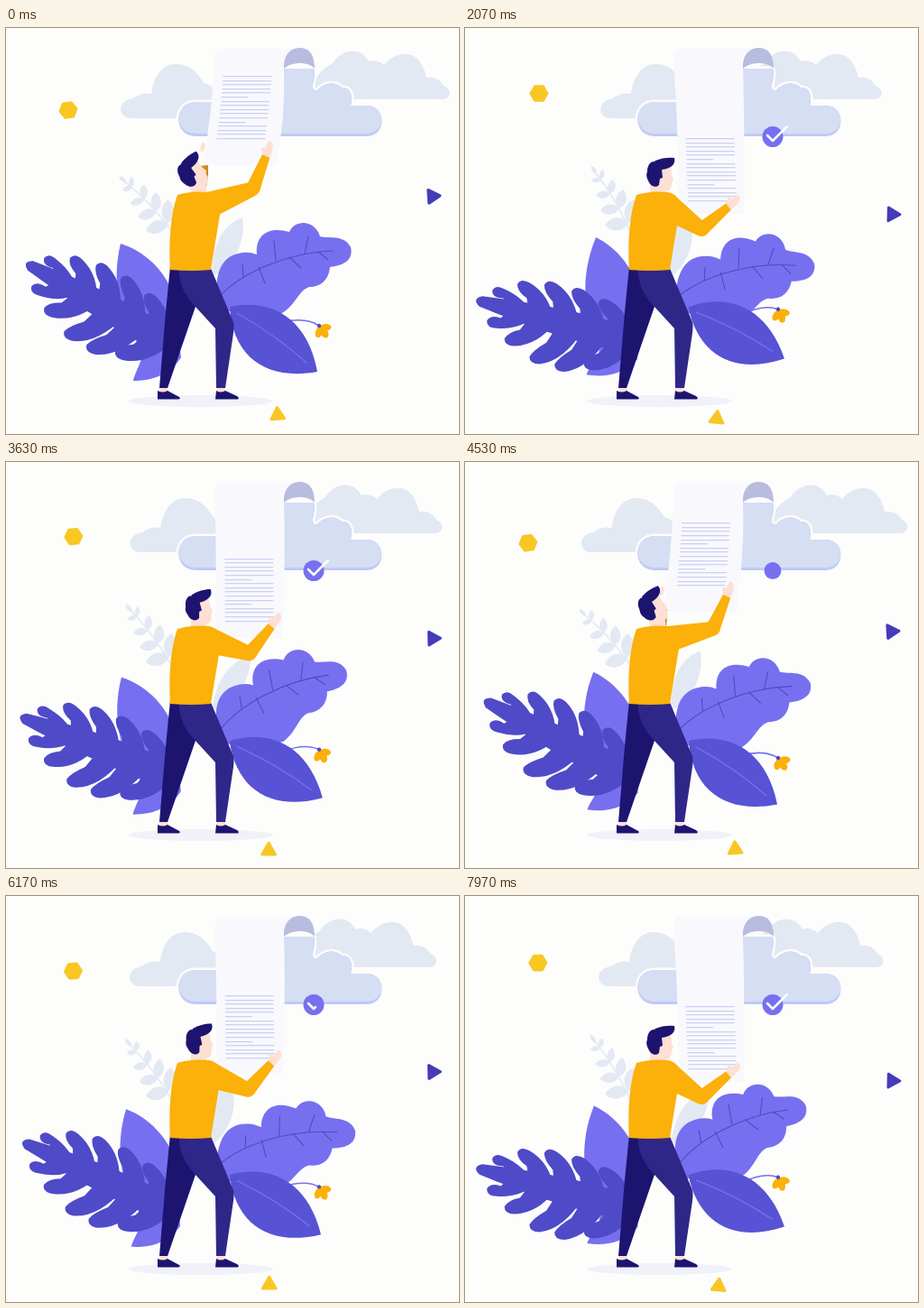
An HTML page with a canvas that plays this animation: 502 by 450 pixels, repeating every 8 s.

```html
<!DOCTYPE html>
<html lang="en">
<head>
<meta charset="utf-8">
<title>Pulling down a list</title>
<style>
  html, body { margin: 0; width: 100%; height: 100%; overflow: hidden; background: #fdfdfc; }
  canvas { display: block; }
</style>
</head>
<body>
<canvas id="stage" width="502" height="450"></canvas>
<script>
const ctx = document.getElementById('stage').getContext('2d');
const LOOP = 8000, CYCLE = 5200;
const C = {
  bg: '#fdfdfc', pale: '#e3e9f3', grey: '#d5def2', edge: '#c0c9f6', paper: '#f9f9fd',
  roll: '#b8bde0', line: '#cdd1f3', purple: '#7670f0', deep: '#5852d4', vein: '#504ac0',
  fern: '#4f4ac8', shirt: '#fbb00a', sleeve: '#cf8d1c', skin: '#fde0d3', navy: '#1d1470',
  thigh: '#2f2788', yellow: '#f9c724', tri: '#443cb8', shade: '#f0f1f9'
};

// Key times: one shared cycle, and a freer sway for the big leaf
const BEATS = [0, 330, 930, 1630, 2070, 2770, 3630, 4950, 5200];
const SWAY = [0, 930, 2070, 3630, 5530, 6830, 7970];
const KEYS = {
  pull: [0, .34, .77, 1, 1, 1, .73, 0, 0],
  drift: [0, .12, .4, .78, 1, .91, .45, 0, 0],
  cloud: [0, .3, .47, .87, 1, .93, .27, 0, 0],
  fern: [14, 10, 10, 0, 0, 0, 6.5, 14, 14],
  droop: [0, .27, .4, .97, 1, 1, .62, 0, 0],
  sprig: [0, .19, .45, 1, 1, .93, .53, 0, 0],
  oak: [0, 5.2, 7.2, -5, 7.4, 4.6, -4.6]
};

const mix = (a, b, k) => a + (b - a) * k;
const clamp = v => Math.max(0, Math.min(1, v));
const rad = d => d * Math.PI / 180;
const ramp = (t, a, b) => { const k = clamp((t - a) / (b - a)); return k * k * (3 - 2 * k); };

// Smooth interpolation that never overshoots its keys
function track(t, times, vals) {
  const last = times.length - 1;
  let i = 0;
  while (i < last - 1 && t > times[i + 1]) i++;
  const slope = j => (vals[j + 1] - vals[j]) / (times[j + 1] - times[j]);
  const tangent = j => {
    if (j === 0 || j === last) return 0;
    const a = slope(j - 1), b = slope(j);
    return a * b <= 0 ? 0 : 2 * a * b / (a + b);
  };
  const h = times[i + 1] - times[i], k = clamp((t - times[i]) / h);
  const k2 = k * k, k3 = k2 * k;
  return vals[i] * (2 * k3 - 3 * k2 + 1) + vals[i + 1] * (3 * k2 - 2 * k3)
    + h * (tangent(i) * (k3 - 2 * k2 + k) + tangent(i + 1) * (k3 - k2));
}

function fill(d, color) {
  ctx.fillStyle = color;
  ctx.fill(new Path2D(d));
}
function stroke(d, color, w) {
  ctx.strokeStyle = color;
  ctx.lineWidth = w;
  ctx.stroke(new Path2D(d));
}
function oval(x, y, rx, ry, color, rot = 0) {
  ctx.fillStyle = color;
  ctx.beginPath();
  ctx.ellipse(x, y, rx, ry, rot, 0, Math.PI * 2);
  ctx.fill();
}
function place(x, y, deg, draw) {
  ctx.save();
  ctx.translate(x, y);
  ctx.rotate(rad(deg));
  draw();
  ctx.restore();
}
const spin = (x, y, deg, draw) => place(x, y, deg, () => { ctx.translate(-x, -y); draw(); });

function polygon(x, y, r, n, deg, color) {
  place(x, y, deg, () => {
    ctx.beginPath();
    for (let i = 0; i < n; i++) {
      const a = i * 2 * Math.PI / n;
      ctx.lineTo(r * Math.cos(a), r * Math.sin(a));
    }
    ctx.closePath();
    ctx.fillStyle = ctx.strokeStyle = color;
    ctx.lineWidth = 3;
    ctx.fill();
    ctx.stroke();
  });
}

function paleClouds(drift, shift) {
  place(23 * drift, 0, 0, () => fill('M139 100C123 100 123 80 141 78C148 72 156 72 161 73C164 52 174 40 188 40C204 40 214 51 219 61C234 64 240 80 240 100Z', C.pale));
  place(-30 * shift, 0, 0, () => fill('M345 79C335 55 352 45 362 39C372 23 393 20 402 37C407 35 414 36 419 41C427 31 438 28 444 29C456 29 464 43 466 55C477 53 483 60 485 64C494 67 494 79 483 79Z', C.pale));
}

function greyCloud() {
  const d = 'M210 82H300V45H341C345 56 334 70 345 69C352 60 366 59 372 66C382 65 385 76 382 86H400C422 86 422 120 400 120H210C185 120 185 82 210 82Z';
  stroke(d, C.bg, 5);
  fill(d, C.edge);
  ctx.save();
  ctx.clip(new Path2D(d));
  ctx.translate(0, -3);
  fill(d, C.grey);
  ctx.restore();
}

function paper(pull) {
  const bottom = 153 + 53 * Math.pow(pull, .7);
  const bl = mix(218, 237, pull), br = mix(299, 309, pull);
  const edge = y => 231 + (bl - 231) * Math.pow(Math.max(0, y - 23) / (bottom - 23), 1.5);
  fill(`M238 23H327C314 24 308 33 308 46Q310 100 ${br} ${bottom}H${bl}Q${mix(228, 236, pull)} 95 231 40Q231 23 238 23Z`, C.paper);
  fill('M308 45C307 29 316 22 326 22C337 22 342 31 342 45C335 37 317 37 308 45Z', C.roll);
  const top = 53 + 69 * Math.pow(pull, .8);
  for (let i = 0; i < 16; i++) {
    const y = Math.round(top + i * 4.6), x = edge(y) + 11;
    const w = i % 6 === 5 ? 30 : 54;
    ctx.fillStyle = C.line;
    ctx.fillRect(x, y, w, 1.3);
  }
}

function badge(u) {
  const pop = 1.24 * ramp(u, 80, 330) - .24 * ramp(u, 330, 560);
  const size = pop * (1 - ramp(u, 4450, 4750));
  if (size <= 0) return;
  oval(341, 120.5, 11.5 * size, 11.5 * size, C.purple);
  const ink = ramp(u, 780, 1250) * (1 - ramp(u, 3750, 4200));
  if (ink <= 0) return;
  ctx.setLineDash([31 * ink, 60]);
  stroke('M335 119L341 125L358 108', C.bg, 2.6);
  ctx.setLineDash([]);
}

function leaf(x, y, deg, len, w) {
  place(x, y, deg, () => fill(`M0 0C${len * .3} ${-w} ${len * .8} ${-w * .8} ${len} 0C${len * .7} ${w} ${len * .2} ${w} 0 0Z`, C.pale));
}

function sprig(k) {
  // local x runs from the base to the tip
  place(182, 222, 225 + 13 * k, () => {
    stroke('M-10 -2Q40 6 78 0', C.pale, 1.6);
    for (let i = 0; i < 4; i++) {
      const s = 62 - i * 19;
      const len = 11 + i * 5;
      leaf(s, 2, -62, len, 4 + i * 2);
      leaf(s + 1, 2, 46, len, 4 + i * 2);
    }
    leaf(70, 1, 0, 11, 3);
  });
}

function backLeaf(t) {
  const deg = 5.2 - 5.2 * Math.cos(2 * Math.PI * t / 3400);
  spin(180, 348, deg, () => fill('M127 239C153 247 175 268 184 292L194 365C180 387 158 391 141 391C144 378 154 366 150 355C124 322 117 280 127 239Z', C.purple));
}

function fern(deg) {
  const low = [[30, 41], [61, 51], [90, 50], [122, 38], [146, 24]];
  const high = [[32, -38], [64, -42], [95, -41], [124, -34], [149, -20]];
  spin(183, 322, deg, () => place(172, 345, 195.2, () => {
    fill('M-5 -13C50 -17 110 -12 160 -6Q171 0 160 6C110 13 50 19 -5 16Z', C.fern);
    for (const [s, n] of [...low, ...high]) {
      // each lobe is a swept drop: broad at the stem, rounded at the end
      const m = -n, side = Math.sign(m);
      fill(`M${s - 48} 0Q${s - 36} ${m * .8} ${s - 11} ${m}Q${s} ${m + side * 3} ${s + 2} ${m - side * 5}Q${s} ${m - side * 13} ${s - 12} ${m * .5}L${s - 20} 0Z`, C.fern);
    }
  }));
}

function oakLeaf(deg) {
  spin(230, 275, -1.7 * deg, () => fill('M228 276C228 240 240 218 262 210C266 235 255 262 228 276Z', C.pale));
  spin(235, 295, deg, () => {
    fill('M234 300C231 270 240 254 257 250Q268 247 278 251C276 230 290 219 314 226C320 212 342 212 348 231C358 234 374 228 382 243C385 256 376 263 359 265C358 279 349 287 336 287C324 291 322 306 306 316C288 319 260 316 240 313Z', C.purple);
    stroke('M236 298C260 272 310 249 362 247M263 275L262 262M280 265L287 283M299 258L297 236M314 254L327 266M331 250L335 231M346 248L357 257', C.vein, 1.1);
  });
}

function flower(k) {
  const y = -18 * k;
  stroke(`M306 ${326 + y * .45}Q332 ${320 + y * .8} 347 ${330 + y}`, C.purple, 1.6);
  place(348, 330 + y, 14 * k, () => {
    oval(-1, 7, 4, 6.5, C.shirt, .35);
    oval(5, 8, 4, 6, C.shirt, -.5);
    oval(6, 2, 6.5, 4, C.shirt, -.1);
    oval(-1, 0, 2.2, 2.2, C.vein);
  });
}

function darkLeaf(k) {
  spin(250, 312, -8.3 * k, () => {
    fill('M248 309C288 300 333 316 345 381C290 391 251 366 248 309Z', C.deep);
    stroke('M256 316Q300 341 333 371', C.purple, 1.3);
  });
}

function legs() {
  oval(215.5, 413.5, 80, 6.5, C.shade);
  fill('M171 396H180L179 405H170ZM234 396H242L243 405H233Z', C.skin);
  fill('M168 402Q174 405 179 402L192 409Q194 411 191 411.5H168ZM233 402Q238 405 243 402L256 408Q259 410 257 411.5H232Z', C.navy);
  fill('M182 264H214L211 306L179 399H170L177 315Z', C.navy);
  fill('M192 264H226L252 326Q253 330 252 338L243 399H233L232 333L210 309Q194 293 192 274Z', C.thigh);
}

function farArm(pull) {
  place(0, 80 * pull, 0, () => {
    oval(218, 132, 2.5, 5, C.skin, .2);
    fill('M214 153L224 152Q225 171 219 184L207 183Z', C.sleeve);
  });
}

function head(pull) {
  fill('M205 170L221 168L223 187H205Z', C.skin);
  spin(208, 180, -30 * (1 - pull), () => {
    fill('M205 178L207 160L216 152L228 152L229 163L231 168L229 171C229 180 225 183 216 181Z', C.skin);
    fill('M202 159C202 150 208 146 212 149Q209 148 211 147C217 144 227 143 232 144C234 151 228 156 218 157L219 166L216 167L215 174C211 178 205 175 203 169Q200 164 202 159Z', C.navy);
  });
}

function limb(x1, y1, x2, y2, r1, r2) {
  const len = Math.hypot(x2 - x1, y2 - y1);
  place(x1, y1, Math.atan2(y2 - y1, x2 - x1) * 180 / Math.PI, () =>
    fill(`M0 ${-r1}L${len} ${-r2}V${r2}L0 ${r1}Z`, C.shirt));
}

function body(pull) {
  fill('M190 185Q206 180 224 182Q237 188 237 207Q232 237 227 268Q205 270 182 268C180 235 183 204 190 185Z', C.shirt);
  const up = rad(mix(-14, 42.5, pull)), fore = rad(-68 + 28 * Math.pow(pull, 1.6));
  const ex = 226 + 49 * Math.cos(up), ey = 190 + 49 * Math.sin(up);
  const wx = ex + 39 * Math.cos(fore), wy = ey + 39 * Math.sin(fore);

  place(wx, wy, fore * 180 / Math.PI, () =>
    fill('M-3 -4Q3 -5 5 -8L8 -7L8 -4L16 -4Q18 -2 16 1Q12 6 -3 4Z', C.skin));
  oval(223, 197, 15, 15, C.shirt);
  limb(223, 197, ex, ey, 15, 8);
  limb(ex, ey, wx, wy, 8, 4.5);
  oval(ex, ey, 8, 8, C.shirt);
}

function draw(t) {
  const u = t % CYCLE;
  const beat = name => track(u, BEATS, KEYS[name]);
  const pull = clamp(beat('pull')), drift = beat('drift'), droop = beat('droop');

  ctx.fillStyle = C.bg;
  ctx.fillRect(0, 0, 502, 450);
  ctx.lineCap = ctx.lineJoin = 'round';

  paleClouds(drift, beat('cloud'));
  greyCloud();
  polygon(69 + 13 * drift, 91 - 18.5 * drift, 9, 6, -8 + 8 * drift, C.yellow);
  polygon(472.5 + drift, 186.5 + 20 * drift, 8.5, 3, -4 + 6 * drift, C.tri);
  polygon(301 - 22 * drift, 429 + 4 * drift, 8.5, 3, -94 + 10 * drift, C.yellow);

  sprig(beat('sprig'));
  backLeaf(t);
  fern(beat('fern'));
  flower(droop);
  oakLeaf(track(t, SWAY, KEYS.oak));
  darkLeaf(droop);
  paper(pull);
  badge(u);
  legs();
  farArm(pull);
  head(pull);
  body(pull);
}

function tick() {
  draw(performance.now() % LOOP);
  requestAnimationFrame(tick);
}
tick();
</script>
</body>
</html>
```
